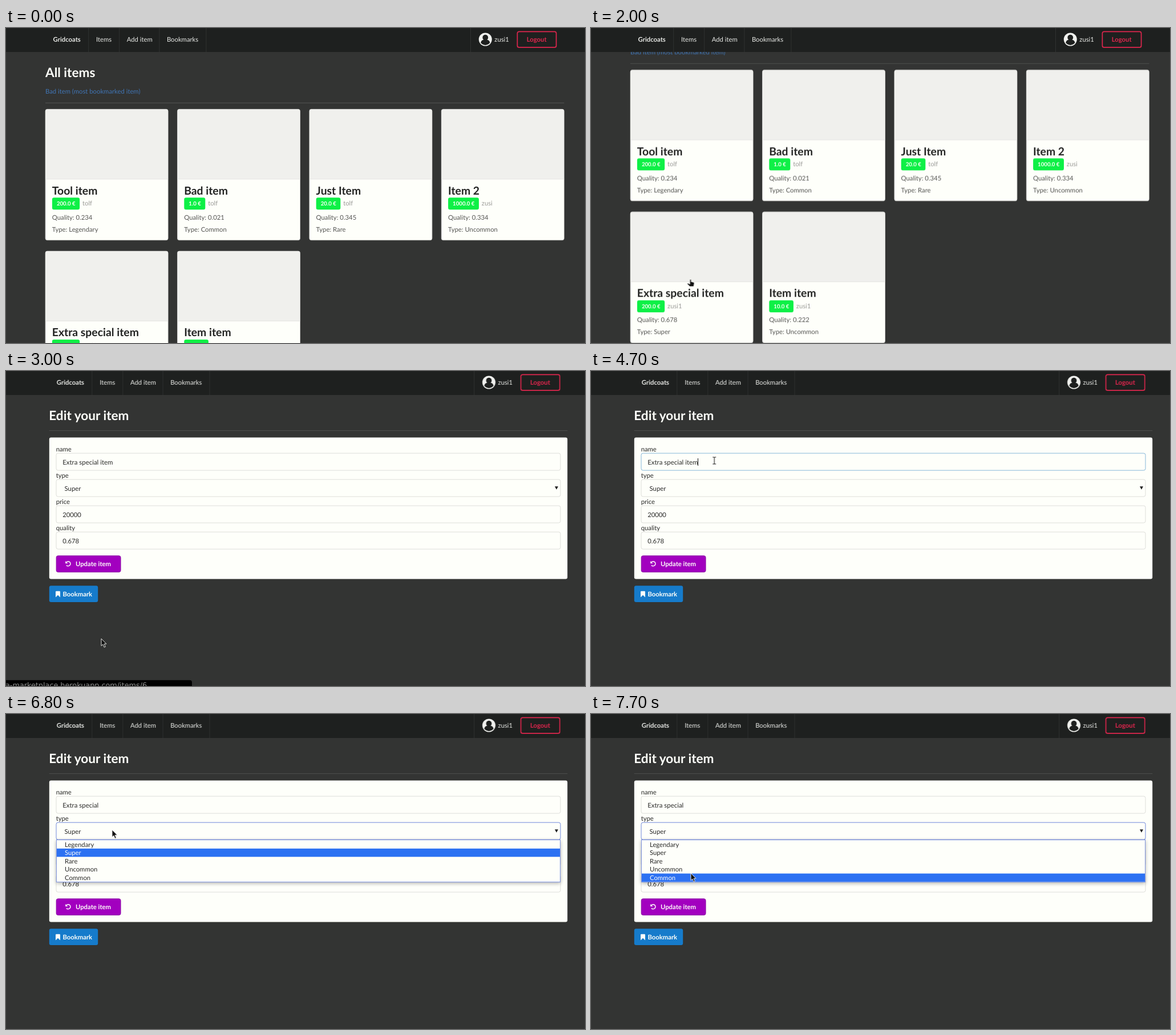
Write an HTML page that moves like this. It is 1015 px wide and 552 px high and loops after 8 s.

```html
<!DOCTYPE html>
<html lang="en">
<head>
<meta charset="utf-8">
<title>Item marketplace</title>
<style>
html, body { margin: 0; width: 100%; height: 100%; overflow: hidden; background: #333433; }
svg { display: block; width: 1015px; height: 552px; }
text { font: 11.29px Lato, sans-serif; fill: #2a2a29; text-rendering: geometricPrecision; white-space: pre; }
.b { font-weight: 700; }
.w { fill: #fefffa; }
.nav text { fill: #e9eae7; }
.nav .out { fill: #e0264e; }
.h1 { font-size: 22.58px; font-weight: 700; fill: #fefffa; }
.h2 { font-size: 19.36px; font-weight: 700; fill: #222322; }
.price { font-size: 9.68px; font-weight: 700; fill: #fefffa; }
.owner { fill: #9b9b98; }
.meta { fill: #555553; }
.link { fill: #4075b5; }
.url { font: 12.8px "DejaVu Sans", sans-serif; fill: #8b8c8b; }
.typed { font-size: 11.45px; }
.field { fill: #fefffa; stroke: #dededa; }
.menu { filter: drop-shadow(0 2px 3px rgba(0, 0, 0, .3)); }

/* Percentages: 1.25% = 100 ms */
.anim { animation: 8s step-end infinite; }
#list { animation-name: list; }
#page { animation-name: page; }
#edit, #arrow, #hand, #beam, #caret, #menu, #status { opacity: 0; }
#edit { animation-name: edit; }
#bar { animation-name: bar; }
#status { animation-name: status; }
#cursor { animation-name: cursor; }
#arrow { animation-name: arrow; }
#hand { animation-name: hand; }
#beam { animation-name: beam; }
#caret { animation-name: caret; }
#name { animation-name: name; }
#type { animation-name: type; }
#menu { animation-name: menu; }
#pick { animation-name: pick; }
#cut1 { animation-name: cut1; }
#cut2 { animation-name: cut2; }
#cut3 { animation-name: cut3; }
#cut4 { animation-name: cut4; }
#opt1 { animation-name: opt1; }
#opt2 { animation-name: opt2; }
#opt3 { animation-name: opt3; }
#opt4 { animation-name: opt4; }

@keyframes list { 37.5%, to { opacity: 0 } }
@keyframes edit { 37.5%, to { opacity: 1 } }
@keyframes bar { 37.5%, to { transform: translateX(6.2px) } }
@keyframes page {
  11.25% { transform: translateY(-61.4px) }
  15%, to { transform: translateY(-68.8px) }
}
@keyframes status {
  27.5% { opacity: .4 }
  28.75% { opacity: .8 }
  30% { opacity: 1 }
  38.75% { opacity: .4 }
  40%, to { opacity: 0 }
}
@keyframes cursor {
  6.25% { transform: translate(48px, 128px) }
  7.5% { transform: translate(180px, 215px) }
  8.75% { transform: translate(274px, 268.5px) }
  20% { transform: translate(262px, 300px) }
  21.25% { transform: translate(235px, 350px) }
  22.5% { transform: translate(205px, 400px) }
  23.75% { transform: translate(183px, 432px) }
  25% { transform: translate(174.5px, 440px) }
  27.5% { transform: translate(173.5px, 446px) }
  28.75% { transform: translate(172px, 453px) }
  30% { transform: translate(170px, 460px) }
  31.25% { transform: translate(168px, 466px) }
  32.5% { transform: translate(167px, 469px) }
  38.75% { transform: translate(195px, 330px) }
  40% { transform: translate(213px, 211px) }
  43.75% { transform: translate(216.2px, 150px) }
  47.5% { transform: translate(216.2px, 157px) }
  80% { transform: translate(208px, 166px) }
  81.25% { transform: translate(194px, 190px) }
  82.5% { transform: translate(187px, 199px) }
  85% { transform: translate(186px, 203px) }
  91.25% { transform: translate(184px, 240px) }
  92.5% { transform: translate(181px, 257px) }
  95% { transform: translate(178px, 271px) }
  96.25%, to { transform: translate(175px, 279px) }
}
@keyframes arrow {
  6.25% { opacity: 1 }
  21.25% { opacity: 0 }
  37.5% { opacity: 1 }
  43.75% { opacity: 0 }
  81.25%, to { opacity: 1 }
}
@keyframes hand { 21.25% { opacity: 1 } 37.5%, to { opacity: 0 } }
@keyframes beam { 43.75% { opacity: 1 } 81.25%, to { opacity: 0 } }
@keyframes caret {
  58.75% { opacity: 1; transform: translateX(187px) }
  61.25% { opacity: 1; transform: translateX(178px) }
  63.75% { opacity: 1; transform: translateX(171.5px) }
  65% { opacity: 0; transform: translateX(171.5px) }
  72.5% { opacity: 1; transform: translateX(164.5px) }
  75% { opacity: 1; transform: translateX(163px) }
  81.25%, to { opacity: 0; transform: translateX(163px) }
}
@keyframes name { 58.75% { stroke: #85b7d9 } 85%, to { stroke: #dededa } }
@keyframes type { 85%, to { stroke: #6f87db } }
@keyframes menu { 85%, to { opacity: 1 } }
@keyframes pick {
  92.5% { transform: translateY(14.55px) }
  95% { transform: translateY(29.1px) }
  96.25%, to { transform: translateY(43.65px) }
}
@keyframes cut1 { 70%, to { visibility: hidden } }
@keyframes cut2 { 68.75%, to { visibility: hidden } }
@keyframes cut3 { 63.75%, to { visibility: hidden } }
@keyframes cut4 { 61.25%, to { visibility: hidden } }
@keyframes opt1 { from { fill: #fefffa } 92.5%, to { fill: #2a2a29 } }
@keyframes opt2 { 92.5% { fill: #fefffa } 95%, to { fill: #2a2a29 } }
@keyframes opt3 { 95% { fill: #fefffa } 96.25%, to { fill: #2a2a29 } }
@keyframes opt4 { 96.25%, to { fill: #fefffa } }
</style>
</head>
<body>
<script>
const text = (x, y, str, cls = '', id = '') =>
  `<text x="${x}" y="${y}" class="${cls}"${id && ` id="${id}"`}>${str}</text>`;
const rect = (x, y, w, h, fill, r = 0, more = '') =>
  `<rect x="${x}" y="${y}" width="${w}" height="${h}" rx="${r}" fill="${fill}" ${more}/>`;
const group = (id, body) => `<g id="${id}" class="anim">${body}</g>`;

const items = [
  ['Tool item', '200.0', 'tolf', '0.234', 'Legendary'],
  ['Bad item', '1.0', 'tolf', '0.021', 'Common'],
  ['Just Item', '20.0', 'tolf', '0.345', 'Rare'],
  ['Item 2', '1000.0', 'zusi', '0.334', 'Uncommon'],
  ['Extra special item', '200.0', 'zusi1', '0.678', 'Super'],
  ['Item item', '10.0', 'zusi1', '0.222', 'Uncommon'],
];

function card([title, price, owner, quality, type], i) {
  const x = 69.1 + i % 4 * 231.4, y = 142.4 + (i >> 2) * 248.7;
  const tag = 37 + (price.length - 3) * 5.62;
  return `<g transform="translate(${x} ${y})">` +
    rect(0, 0, 215, 229.3, '#fefffa', 3.2, 'stroke="#d4d4d2" stroke-width=".8"') +
    '<path d="M.3 122V3.2a3 3 0 0 1 3-3h208.4a3 3 0 0 1 3 3V122z" fill="#f0f0ed"/>' +
    rect(0, 122, 215, .9, '#e2e2df') +
    text(11.7, 149.4, title, 'h2') +
    rect(11.8, 154.8, tag, 21, '#0ef046', 3.2) +
    text(19.8, 168.6, price + ' €', 'price') +
    text(16.7 + tag, 168.6, owner, 'owner') +
    text(11.7, 193.3, 'Quality: ' + quality, 'meta') +
    text(11.7, 214.4, 'Type: ' + type, 'meta') + '</g>';
}

const list = group('list', group('page',
  text(69, 86, 'All items', 'h1') +
  text(69, 115.2, 'Bad item (most bookmarked item)', 'link') +
  rect(69, 130.8, 909.5, 1, '#555655') +
  items.map(card).join('')));

const field = (label, i, id = '') =>
  text(87.7, 140.6 + i * 46, label) +
  rect(88, 144.1 + i * 46, 884, 30, '', 3.2, `class="field anim" id="${id}"`);

const options = ['Legendary', 'Super', 'Rare', 'Uncommon', 'Common'];
const typed = 'Extra special <tspan id="cut1" class="anim">i</tspan>' +
  '<tspan id="cut2" class="anim">t</tspan><tspan id="cut3" class="anim">e</tspan>' +
  '<tspan id="cut4" class="anim">m</tspan>';

const menu = group('menu',
  rect(88.4, 220.6, 883.2, 73.8, '#fefffa', 0, 'class="menu" stroke="#7a8fdd"') +
  rect(89, 235.8, 882, 14.5, '#2c71f2', 0, 'id="pick" class="anim"') +
  options.map((o, i) => text(103, 232.6 + i * 14.55, o, 'anim', 'opt' + i)).join(''));

const edit = group('edit',
  text(75.3, 86, 'Edit your item', 'h1') +
  rect(75.7, 104, 908.6, 1, '#4c4d4c') +
  rect(75.8, 116.5, 908.4, 248, '#fefffa', 3.2) +
  field('name', 0, 'name') + field('type', 1, 'type') +
  field('price', 2, 'cost') + field('quality', 3, 'rank') +
  text(99.2, 163.8, typed, 'typed') +
  text(102.6, 209.8, 'Super') + text(99.2, 255.8, '20000') + text(99.2, 301.8, '0.678') +
  '<path d="M962 202.3h6l-3 5.4z" fill="#1b1b1b"/>' +
  rect(0, 153, 1, 13, '#111', 0, 'id="caret" class="anim"') +
  rect(88.1, 323.7, 113, 28.7, '#a200bf', 3.2, 'stroke="#84099c" stroke-width=".8"') +
  '<path d="M105.6 335.6a4 4 0 1 1 .3 4.8" fill="none" stroke="#fefffa" stroke-width="1.5"/>' +
  '<path d="M104.2 333v4.2h4.2z" fill="#fefffa"/>' +
  text(122, 342.2, 'Update item', 'b w') +
  rect(75.8, 376.2, 85.4, 28.8, '#167bcb', 3.2) +
  '<path d="M87 387q0-1.2 1.2-1.2h5.6q1.2 0 1.2 1.2v9.4l-4-3.6-4 3.6z" fill="#fefffa"/>' +
  text(99.4, 394.8, 'Bookmark', 'b w') + menu);

const nav = rect(0, 0, 1015, 42, '#1e201f') + '<g class="nav">' + group('bar',
  [144.2, 198.2, 268.4, 350.4, 814].map(x => rect(x, 0, 1, 42, '#303231')).join('') +
  text(82.6, 24, 'Gridcoats', 'b') + text(158, 24, 'Items') +
  text(211.7, 24, 'Add item') + text(281.9, 24, 'Bookmarks') +
  '<circle cx="840.3" cy="20" r="11.5" fill="#f1f2ef"/>' +
  '<path d="M832.2 25.7q1-4.4 4.6-5h7q3.6.6 4.6 5a9.9 9.9 0 0 1-16.2 0z" fill="#1e201f"/>' +
  '<circle cx="840.3" cy="16.7" r="4.9" fill="#1e201f"/>' +
  text(856.3, 23.6, 'zusi1') +
  rect(896.4, 6.3, 68.2, 27.6, 'none', 3, 'stroke="#e0264e" stroke-width="1.7"') +
  text(912.7, 24, 'Logout', 'b out')) + '</g>';

const status = group('status',
  '<path d="M0 541.8h322q4 0 4 4V552H0z" fill="#000"/>' +
  text(-1, 555, 'a-marketplace.herokuapp.com/items/6', 'url'));

const cursor = group('cursor',
  group('arrow', '<path d="M0 0V12.6l2.9-2.6 2.2 5.2 2.2-1-2.2-5h3.9z" fill="#111" stroke="#f4f4f1" stroke-width=".9"/>') +
  group('hand', '<path d="M-1.2 1q1.2-1.4 2.4 0v3.6l4 .9q1.3.5 1.2 2L5.6 13h-7L-5.6 8.6q-.2-1.8 1.6-1.4L-1.2 9z" fill="#111" stroke="#f4f4f1" stroke-width=".9"/>') +
  group('beam', '<path d="M-3-6h2q1 0 1 1V5q0 1-1 1h-2M3-6H1Q0-6 0-5V5q0 1 1 1h2" fill="none" stroke="#222" stroke-width="1.1"/>'));

document.body.innerHTML =
  `<svg viewBox="0 0 1015 552">${list}${edit}${nav}${status}${cursor}</svg>`;
</script>
</body>
</html>
```
